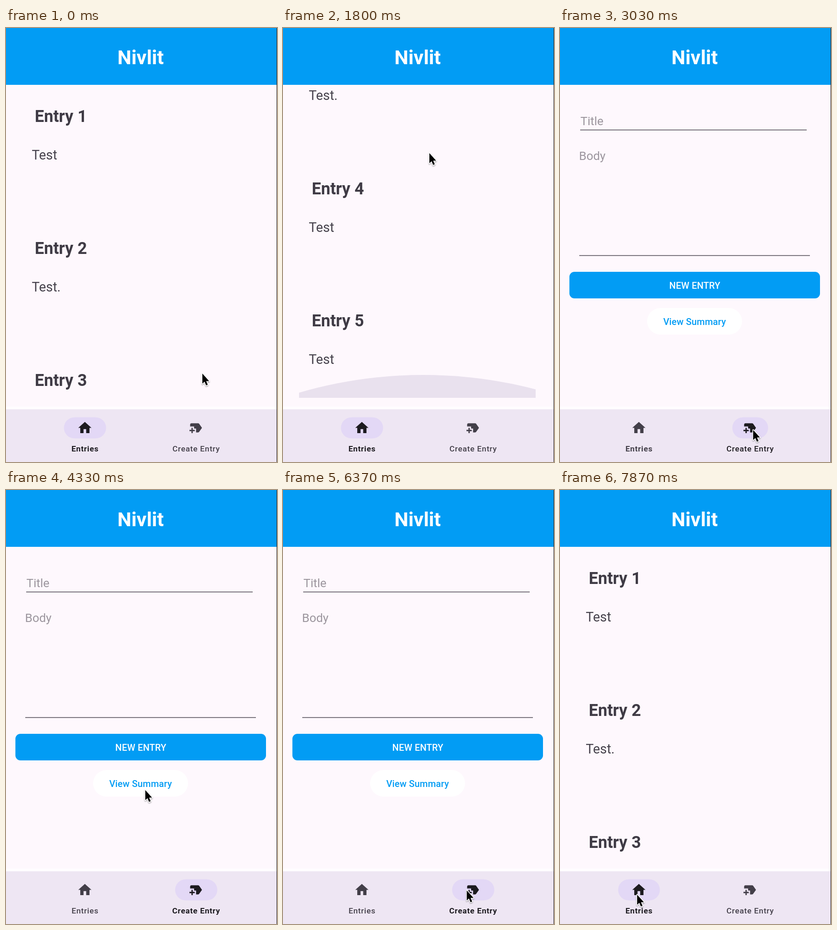
These frames come from a looping animation (591x947 px, 8000 ms). An HTML page:

```html
<!DOCTYPE html>
<html lang="en">
<head>
<meta charset="utf-8">
<title>Entries</title>
<style>
  html, body { margin: 0; width: 100%; height: 100%; overflow: hidden; background: #fef8fd; }
  svg { display: block; width: 100%; height: 100%; font-family: Roboto, sans-serif; }
  .mid { text-anchor: middle; }
  .head { font-size: 43.1px; font-weight: 700; fill: #fff; }
  .title { font-size: 36px; font-weight: 700; fill: #3f3b45; }
  .note { font-size: 28.75px; fill: #46424c; }
  .hint { font-size: 25.9px; fill: #9c969e; }
  .btn { font-size: 20.1px; font-weight: 500; letter-spacing: .14px; }
  .sum { font-size: 43.65px; fill: #029cf4; }
  .tab { font-size: 17.25px; letter-spacing: .74px; }
</style>
</head>
<body>
<svg viewBox="0 0 591 947" xmlns="http://www.w3.org/2000/svg">
  <defs>
    <clipPath id="view"><rect x="35" y="124" width="516" height="683"/></clipPath>
    <filter id="shade" x="-50%" y="-50%" width="200%" height="200%">
      <feDropShadow dx="0" dy="1.5" stdDeviation="1.2" flood-opacity=".4"/>
    </filter>
  </defs>
  <rect width="591" height="947" fill="#fef8fd"/>
  <rect y="826" width="591" height="6" fill="#fffdff"/>

  <g id="list" clip-path="url(#view)">
    <g id="items"></g>
    <circle id="glow" cx="306" r="966" fill="#e9e1ee"/>
  </g>

  <g id="form">
    <text class="hint" x="44.5" y="212">Title</text>
    <path d="M44 222.5H538M42 496.5H545" stroke="#4a464f" stroke-width="1.5"/>
    <text class="hint" x="41.5" y="288">Body</text>
    <rect x="20.5" y="532" width="546.5" height="58" rx="11" fill="#029cf4"/>
    <text class="btn mid" x="294" y="569" fill="#fff">NEW ENTRY</text>
    <rect x="190" y="611" width="207" height="58" rx="29" fill="#fff"/>
    <text class="btn mid" x="293.5" y="648" fill="#029cf4">View Summary</text>
  </g>

  <text id="summary" class="sum mid" x="293" y="263">You have entered 5 entries.</text>

  <rect width="591" height="124" fill="#029cf4"/>
  <text class="head mid" x="293.5" y="79">Nivlit</text>

  <rect y="832" width="591" height="115" fill="#eee6f3"/>
  <g id="tabs"></g>
  <rect x="590" width="1" height="947" fill="#2b2a2e"/>

  <path id="cursor" d="M1.2 2V24L6 19.7L9.4 27.8L13 26.3L9.6 18.4H16Z" fill="#000"
        stroke="#fff" stroke-width="3" paint-order="stroke" stroke-linejoin="round" filter="url(#shade)"/>
</svg>
<script>
const LOOP = 8000;
const ROW = 288;
const OPEN_FORM = 2870, OPEN_SUMMARY = 4600, BACK_TO_FORM = 6260, OPEN_LIST = 7540;

// time, x, y of the pointer tip
const PATH = [
  [30, 427, 752], [170, 330, 762], [400, 330, 762], [1000, 338, 11],
  [1200, 332, 444], [1300, 316, 576], [1470, 316, 576], [1700, 319, 220],
  [1800, 318, 271], [2270, 440, 885], [2420, 466, 912], [2600, 420, 875],
  [3600, 420, 875], [4400, 300, 648], [4530, 300, 648], [5330, 385, 835],
  [5570, 383, 840], [6170, 410, 872], [6260, 410, 872], [7030, 224, 866],
  [7400, 167, 881]
];

const TABS = [
  { x: 172, label: "Entries", icon: "M10 20v-6h4v6h5v-8h3L12 3 2 12h3v8z" },
  { x: 414.5, label: "Create Entry", icon: "M21 12l-4.37 6.16c-.37.52-.98.84-1.63.84h-3v-6H9v-3H3V7c0-1.1.9-2 2-2h10c.65 0 1.26.31 1.63.84L21 12zM10 15H7v-3H5v3H2v2h3v3h2v-3h3v-2z" }
];

const el = id => document.getElementById(id);
const clamp = (v, a = 0, b = 1) => Math.min(b, Math.max(a, v));
const span = (t, a, b) => clamp((t - a) / (b - a));
const smooth = p => p * p * (3 - 2 * p);
const show = (id, on) => el(id).setAttribute("display", on ? "inline" : "none");

el("items").innerHTML = ["Test", "Test.", "Test.", "Test", "Test"].map((note, i) =>
  `<g transform="translate(0 ${i * ROW})">
    <text class="title" x="62.8" y="205">Entry ${i + 1}</text>
    <text class="note" x="56.3" y="287">${note}</text>
  </g>`).join("");

el("tabs").innerHTML = TABS.map(tab =>
  `<g>
    <rect y="849.5" height="46" rx="23" fill="#e3d8f6"/>
    <path d="${tab.icon}" transform="translate(${tab.x - 17.25} 855.2) scale(1.4375)"/>
    <text class="tab mid" x="${tab.x + .4}" y="924">${tab.label}</text>
  </g>`).join("");
const tabParts = [...el("tabs").children].map(g => [...g.children]);

function pointer(t) {
  const i = PATH.findIndex(k => k[0] > t);
  if (i === 0) return PATH[0].slice(1);
  if (i < 0) return PATH[PATH.length - 1].slice(1);
  const [a, b] = [PATH[i - 1], PATH[i]];
  const p = smooth(span(t, a[0], b[0]));
  return [a[1] + (b[1] - a[1]) * p, a[2] + (b[2] - a[2]) * p];
}

// The list follows the pointer during each drag
function scrollAt(t, y) {
  if (t < 400 || t >= OPEN_LIST) return 0;
  if (t < 1000) return Math.max(0, 742 - y);
  if (t < 1470) return 731;
  if (t < 1700) return clamp(731 + 556 - y, 731, 757);
  return t < 1800 ? 757 - (y - 220) : 706;
}

function glowAt(t) {
  if (t < 1700) return 60 * smooth(span(t, 1540, 1700));
  if (t < 1800) return 60 - 10 * span(t, 1700, 1800);
  return 50 * (1 - smooth(span(t, 1800, 2250)));
}

function drawTab(i, t) {
  const [pill, icon, label] = tabParts[i];
  const formTab = t >= OPEN_FORM && t < OPEN_LIST;
  const active = (i === 1) === formTab;
  const since = t >= OPEN_LIST ? t - OPEN_LIST : t >= OPEN_FORM ? t - OPEN_FORM : LOOP;
  const grow = 1 - Math.pow(1 - clamp(since / 460), 3.2);
  const w = active ? 92 * (.4 + .6 * grow) : 92;
  const color = active ? "#1d1b20" : "#433f49";
  pill.setAttribute("x", TABS[i].x + .3 - w / 2);
  pill.setAttribute("width", w);
  pill.setAttribute("opacity", active ? clamp(since / 80) : 1 - clamp(since / 80));
  icon.setAttribute("fill", color);
  label.setAttribute("fill", color);
  label.setAttribute("font-weight", active === since > 200 ? 700 : 500);
}

function draw(t) {
  const [x, y] = pointer(t);
  const inSummary = t >= OPEN_SUMMARY && t < BACK_TO_FORM;
  const inList = t < OPEN_FORM || t >= OPEN_LIST;
  show("list", inList);
  show("summary", inSummary);
  show("form", !inList && !inSummary);
  el("items").setAttribute("transform", `translate(0 ${-scrollAt(t, y)})`);
  const h = glowAt(t);
  el("glow").setAttribute("cy", 807 - h + 966);
  el("glow").setAttribute("opacity", clamp(h / 40));
  TABS.forEach((_, i) => drawTab(i, t));
  el("cursor").setAttribute("transform", `translate(${x} ${y})`);
}

const start = performance.now();
function tick() {
  draw((performance.now() - start) % LOOP);
  requestAnimationFrame(tick);
}
tick();
</script>
</body>
</html>
```
